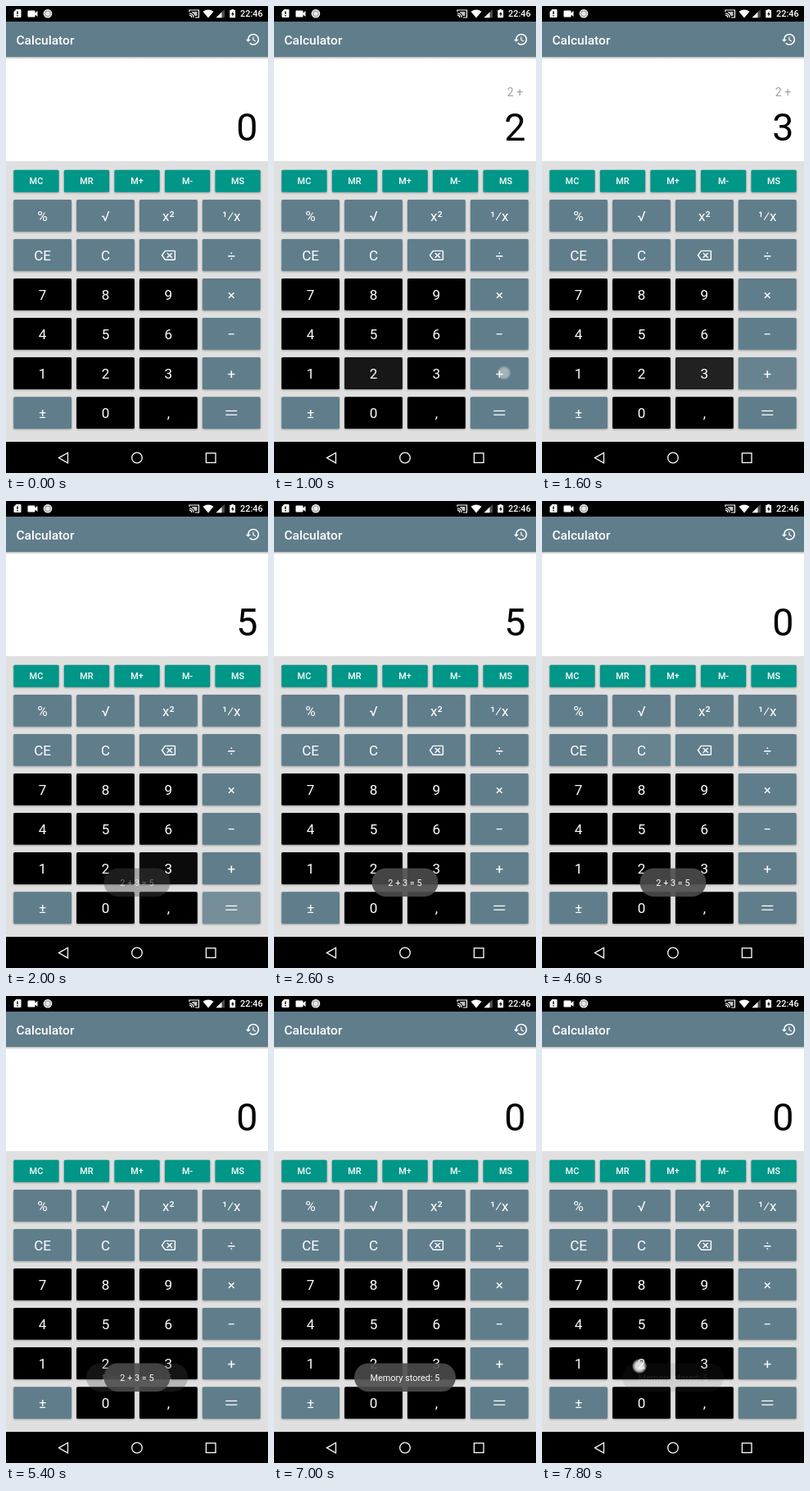
An HTML page for the animation above (8 s loop, 320x569 px).

```html
<!DOCTYPE html>
<html lang="en">
<head>
<meta charset="utf-8">
<title>Calculator</title>
<style>
html, body { margin: 0; width: 100%; height: 100%; overflow: hidden; background: #000; }
svg { display: block; width: 100%; height: 100%; font-family: Roboto, "Noto Sans", sans-serif; }
.key { filter: drop-shadow(0 1px 1px rgba(0,0,0,.32)); }
.mid { text-anchor: middle; }
.end { text-anchor: end; }
.line { fill: none; stroke: #fff; }
</style>
</head>
<body>
<svg id="stage" viewBox="0 0 320 569">
  <defs>
    <linearGradient id="shade" x2="0" y2="1">
      <stop stop-color="#000" stop-opacity=".28"/>
      <stop offset="1" stop-color="#000" stop-opacity="0"/>
    </linearGradient>
    <radialGradient id="dot">
      <stop offset=".55" stop-color="#fff" stop-opacity=".85"/>
      <stop offset=".8" stop-color="#ddd" stop-opacity=".6"/>
      <stop offset="1" stop-color="#888" stop-opacity=".25"/>
    </radialGradient>
  </defs>
  <rect width="320" height="569"/>
  <rect y="62" width="320" height="127" fill="#fff"/>
  <rect y="62" width="320" height="3" fill="url(#shade)"/>
  <rect y="189" width="320" height="342" fill="#e0e0e0"/>
  <rect y="19" width="320" height="43" fill="#607d8b"/>
  <text x="12.4" y="46.5" font-size="15.56" font-weight="500" fill="#fff">Calculator</text>
  <path fill="#fff" transform="translate(292 31.4) scale(.778)" d="M13 3c-4.97 0-9 4.03-9 9H1l3.89 3.89.07.14L9 12H6c0-3.87 3.13-7 7-7s7 3.13 7 7-3.13 7-7 7c-1.93 0-3.68-.79-4.94-2.06l-1.42 1.42C8.27 19.99 10.51 21 13 21c4.97 0 9-4.03 9-9s-4.03-9-9-9zm-1 5v5l4.28 2.54.72-1.21-3.5-2.08V8H12z"/>

  <g id="status" fill="#fff">
    <path d="M12.5 4H17.500q1 0 1 1v8q0 1-1 1h-7q-1 0-1-1V7z"/>
    <path d="M13.300 6.500h1.400v3.500h-1.400zm0 4.500h1.400v1.400h-1.400z" fill="#000"/>
    <path d="M27.500 5.500h7q1 0 1 1v2l3-2.500v7l-3-2.500v2q0 1-1 1h-7q-1 0-1-1v-6q0-1 1-1z"/>
    <circle cx="51" cy="9.300" r="4.700" fill="#aaa" stroke="#fff" stroke-width="1.200"/>
    <circle cx="51" cy="9.300" r="2.600" fill="#e8e8e8"/>
    <path class="line" stroke-width="1.200" d="M224 7V5h11.500v9H231M224 8.800a5.200 5.200 0 0 1 5.200 5.200M224 11.200a2.800 2.800 0 0 1 2.800 2.800"/>
    <path d="M227 7h6.500v5h-3q-1-3-3.500-4z" opacity=".75"/>
    <path d="M240.500 6.800q6.500-4.800 13 0L247 14.500z"/>
    <path d="M267 4v10.300h-10.500z" opacity=".3"/>
    <path d="M263.500 7.400v6.900h-7z"/>
    <path d="M275.300 4h2.800v1h2v9.300h-6.800V5h2z"/>
    <path d="M277.300 6.500l-2.300 3.800h1.500v2.700l2.200-3.900h-1.400z" fill="#000"/>
    <text x="286" y="13.400" font-size="10.900" font-weight="500">22:46</text>
  </g>

  <text id="expr" class="end" x="304.1" y="110" font-size="14" fill="#a0a0a0"></text>
  <text id="value" class="end" x="307.5" y="163.500" font-size="46.67"></text>
  <g id="keys"></g>

  <g class="line" stroke-width="1.3">
    <path d="M75.500 544.300v12.600L64.500 550.600z"/>
    <circle cx="160" cy="550.500" r="6.300"/>
    <rect x="244.400" y="544.800" width="11.600" height="11.600"/>
  </g>
  <g id="toasts"></g>
  <circle id="finger" r="9" fill="url(#dot)"/>
</svg>
<script>
const LOOP = 8000, STEP = 200;
const TEAL = '#009688', SLATE = '#607d8b', BLACK = '#000';
const BACKSPACE = 'M22 3H7c-.69 0-1.23.35-1.59.88L0 12l5.41 8.11c.36.53.9.89 1.59.89h15c1.1 0 2-.9 2-2V5c0-1.1-.9-2-2-2zm0 16H7.070L2.4 12l4.66-7H22v14zm-11.590-2L14 13.410 17.590 17 19 15.590 15.410 12 19 8.410 17.590 7 14 10.590 10.410 7 9 8.410 12.590 12 9 15.590z';
const $ = id => document.getElementById(id);

function add(parent, tag, attrs, text = '') {
  const el = document.createElementNS('http://www.w3.org/2000/svg', tag);
  for (const k in attrs) el.setAttribute(k, attrs[k]);
  el.textContent = text;
  return parent.appendChild(el);
}

const glow = {};
function addKey(label, x, y, width, height, fill, size, weight) {
  const box = { x, y, width, height, rx: 1.5 };
  const mid = x + width / 2;
  add($('keys'), 'rect', { ...box, fill, class: 'key' });
  glow[label] = add($('keys'), 'rect', { ...box, fill: '#fff', opacity: 0 });
  if (label === '⌫') {
    add($('keys'), 'path', { d: BACKSPACE, fill: '#fff', transform: `translate(${mid - 8.8} ${y + 11.7}) scale(.73 .68)` });
  } else if (label === '=') {
    add($('keys'), 'path', { d: `M${mid - 7} ${y + 17.2}h14m-14 4.800h14`, class: 'line', 'stroke-width': 1.3 });
  } else {
    add($('keys'), 'text', {
      x: mid, y: y + (weight > 400 ? 17.4 : 26), class: 'mid', fill: '#fff', 'font-size': size, 'font-weight': weight
    }, label);
  }
}

['MC', 'MR', 'M+', 'M-', 'MS'].forEach((s, i) => addKey(s, 9.3 + i * 61.55, 199.8, 55.3, 27, TEAL, 10.9, 500));
['% √ x² ¹⁄x', 'CE C ⌫ ÷', '7 8 9 ×', '4 5 6 −', '1 2 3 +', '± 0 , ='].forEach((row, r) =>
  row.split(' ').forEach((s, c) =>
    addKey(s, 9.2 + c * 76.9, 235.900 + r * 48.05, 70.8, 38.8, /[\d,]$/.test(s) ? BLACK : SLATE, 17.1, 400)));

function addToast(text, width) {
  const g = add($('toasts'), 'g', {});
  add(g, 'rect', { x: 160 - width / 2, y: 447.5, width, height: 34.5, rx: 17.25, fill: '#4c4c4c', 'fill-opacity': .9 });
  add(g, 'text', { x: 160, y: 469, class: 'mid', fill: '#fff', 'font-size': 10.9 }, text);
  return g;
}
const stored = addToast('Memory stored: 5', 124);
const sum = addToast('2 + 3 = 5', 81);

// [time, value] steps
const values = [[0, '0'], [800, '2'], [1600, '3'], [2000, '5'], [4200, '0']];
const exprs = [[0, ''], [1000, '2 +'], [2000, '']];
const sumFade = [[1800, 0], [2000, .42], [2200, .8], [2400, .96], [2600, 1], [5200, 1], [5400, .95], [5600, .5], [5800, .12], [6000, 0]];
const storedFade = [[5200, 0], [5400, .3], [5600, .7], [5800, .93], [6000, 1], [7400, 1], [7600, .6], [7800, .12], [8000, 0]];
// key, x, y, touch start, touch end, opacity
const taps = [
  ['2', 119, 451, 600, 800, 1], ['+', 281, 447, 1000, 1200, .5],
  ['3', 198, 450, 1400, 1600, 1], ['=', 279, 496, 1800, 2000, .9],
  ['MS', 285, 214, 3000, 3400, .8], ['C', 122, 304, 4000, 4200, .9],
  ['2', 119, 451, 7800, 8000, 1]
];
const ripple = [[-200, 0], [0, .13], [200, .09], [600, 0]];

const held = (track, t) => track.filter(p => p[0] <= t).pop()[1];

function mix(track, t) {
  const i = track.findIndex(p => p[0] > t);
  if (i < 0) return track[track.length - 1][1];
  if (i === 0) return track[0][1];
  const [t0, a] = track[i - 1], [t1, b] = track[i];
  return a + (b - a) * (t - t0) / (t1 - t0);
}

function draw(t) {
  $('value').textContent = held(values, t);
  $('expr').textContent = held(exprs, t);
  sum.setAttribute('opacity', mix(sumFade, t));
  stored.setAttribute('opacity', mix(storedFade, t));

  const light = {};
  let touch = null;
  for (const tap of taps) {
    const [key, , , from, to] = tap;
    light[key] = Math.max(light[key] || 0, to < LOOP ? mix(ripple, t - to) : 0);
    if (t >= from && t < to) touch = tap;
  }
  for (const key in light) glow[key].setAttribute('opacity', light[key]);

  const finger = $('finger');
  finger.setAttribute('opacity', touch ? touch[5] : 0);
  if (touch) {
    finger.setAttribute('cx', touch[1]);
    finger.setAttribute('cy', touch[2]);
  }
}

const start = performance.now();
function tick() {
  const t = (performance.now() - start) % LOOP;
  draw(Math.floor(t / STEP) * STEP);
  requestAnimationFrame(tick);
}
tick();
</script>
</body>
</html>
```
